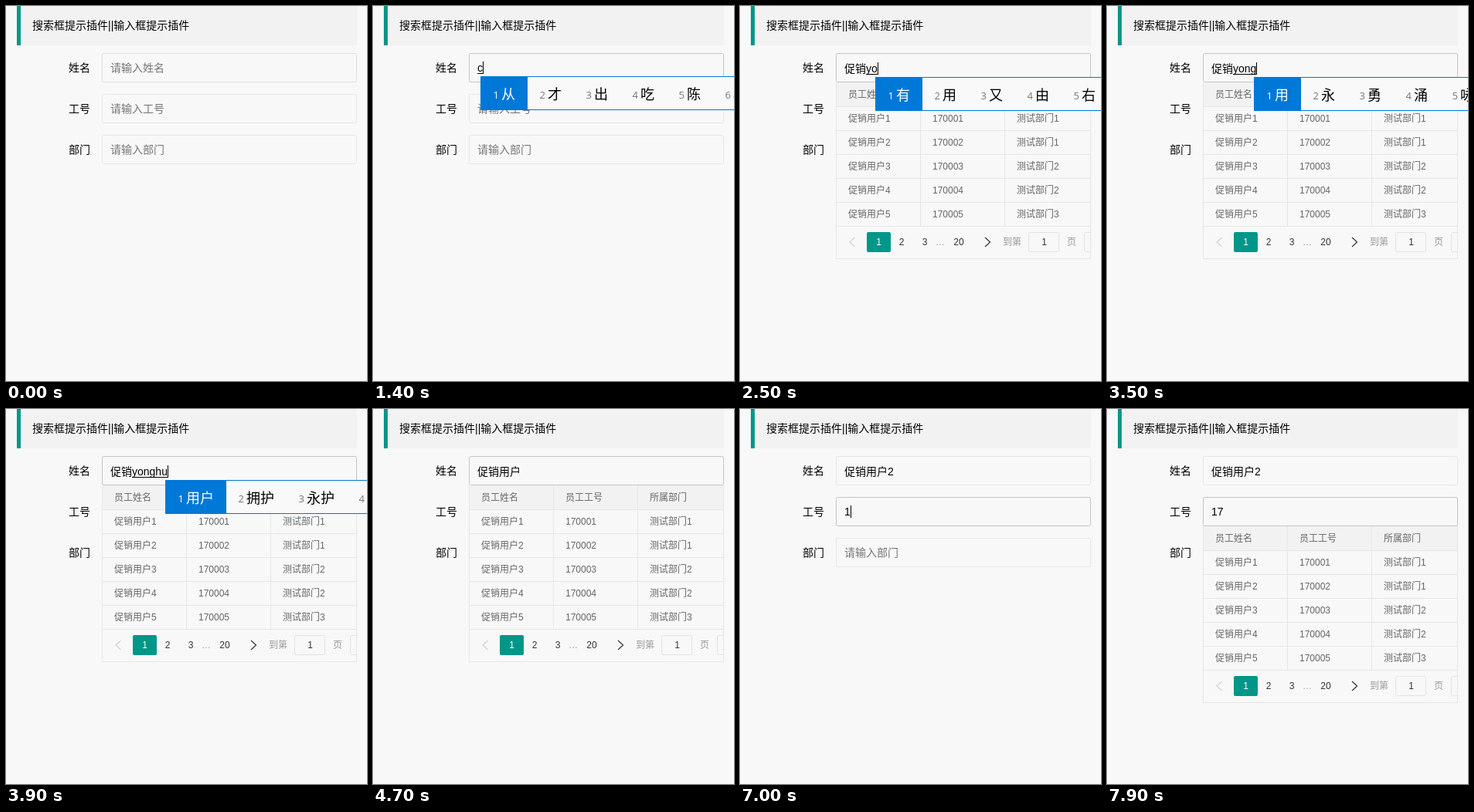
An HTML page for the animation above (8000 ms loop, 467 px wide and 486 px high).

```html
<!DOCTYPE html>
<html lang="zh-CN">
<head>
<meta charset="utf-8">
<style>
html, body { margin: 0; width: 100%; height: 100%; overflow: hidden; background: #f8f8f8; }
svg { display: block; }
text { font: 14px "Liberation Sans", "Noto Sans CJK SC", "Noto Sans CJK", sans-serif; white-space: pre; }
.small text { font-size: 12px; }
.ime .digit { font: 13px "Open Sans", "Noto Sans", sans-serif; }
.ime .word { font: 18px "Noto Sans CJK SC", "Noto Sans CJK", sans-serif; }
</style>
</head>
<body>
<svg id="stage" width="467" height="486" viewBox="0 0 467 486"></svg>
<script>
const LOOP = 8000;
const TEAL = '#009688', BLUE = '#0078d7', LINE = '#e6e6e6', FOCUS = '#c4c4c4';
const stage = document.getElementById('stage');

function add(parent, tag, attrs = {}, content = '') {
  const node = document.createElementNS('http://www.w3.org/2000/svg', tag);
  for (const key in attrs) node.setAttribute(key, attrs[key]);
  node.textContent = content;
  return parent.appendChild(node);
}
const fill = (parent, x, y, width, height, color, rx = 0) =>
  add(parent, 'rect', { x, y, width, height, fill: color, rx });
const frame = (parent, x, y, w, h, color) =>
  add(parent, 'rect', { x: x + .5, y: y + .5, width: w - 1, height: h - 1, rx: 2, fill: 'none', stroke: color });
const label = (parent, x, y, content, color = '#000', extra = {}) =>
  add(parent, 'text', { x, y, fill: color, ...extra }, content);
const show = (node, on) => node.setAttribute('visibility', on ? 'visible' : 'hidden');

// Static page
fill(stage, 14, 0, 5, 51, TEAL);
fill(stage, 19, 0, 435, 51, '#f2f2f2');
label(stage, 34, 30, '搜索框提示插件||输入框提示插件');

const fields = ['姓名', '工号', '部门'].map((name, i) => {
  const top = 61 + 53 * i;
  label(stage, 81, top + 24, name);
  return {
    top,
    border: frame(stage, 124, top, 330, 38, LINE),
    hint: label(stage, 135, top + 24, '请输入' + name, '#757575'),
    value: label(stage, 135, top + 24, '')
  };
});

// Suggestion table, drawn for the first field and shifted for the others
const table = add(stage, 'g', { class: 'small' });
fill(table, 124, 99, 330, 229, '#f8f8f8');
fill(table, 124, 99, 330, 31, '#f2f2f2');
const rows = [['员工姓名', '员工工号', '所属部门']];
[1, 1, 2, 2, 3].forEach((dept, i) =>
  rows.push([`促销用户${i + 1}`, `17000${i + 1}`, `测试部门${dept}`]));
rows.forEach((cells, r) => {
  cells.forEach((cell, c) => label(table, 140 + 109 * c, 119 + 31 * r, cell, '#666'));
  fill(table, 124, 130 + 31 * r, 330, 1, LINE);
});
[233, 342].forEach(x => fill(table, x, 99, 1, 186, LINE));
[124, 453].forEach(x => fill(table, x, 99, 1, 229, LINE));
fill(table, 124, 327, 330, 1, LINE);

const chevron = (d, stroke) => add(table, 'path', { d, stroke, fill: 'none', 'stroke-width': 1.2 });
chevron('M148.5 300L142 306L148.5 312', '#d2d2d2');
chevron('M317 300L323.5 306L317 312', '#333');
fill(table, 164, 293, 31, 26, TEAL, 2);
const pages = [[179.5, '1', '#fff'], [209, '2', '#333'], [239, '3', '#333'],
  [259, '…', '#999'], [283, '20', '#333'], [393.5, '1', '#333']];
pages.forEach(([x, s, color]) => label(table, x, 310, s, color, { 'text-anchor': 'middle' }));
label(table, 340, 310, '到第', '#999');
label(table, 423, 310, '页', '#999');
frame(table, 373, 293, 40, 26, '#e2e2e2');
add(table, 'path', { d: 'M454 293.5H447.5Q445.5 293.5 445.5 295.5V316.5Q445.5 318.5 447.5 318.5H454', fill: 'none', stroke: '#e2e2e2' });

const underline = fill(stage, 0, 0, 0, 1, '#000');
const caret = fill(stage, 0, 0, 1, 16, '#000');
const ime = add(stage, 'g', { class: 'ime' });

const candidates = {
  c: '从 才 出 吃 陈 村',
  cu: '粗 促 醋 簇 卒 猝',
  cux: '促销 粗细 粗线 粗选 促',
  y: '一 有 也 要 月 又',
  yo: '有 用 又 由 右 游',
  yon: '用 永 勇 涌 咏 拥',
  yong: '用 永 勇 涌 咏 拥',
  yongh: '用户 永恒 拥护 用好',
  yonghu: '用户 拥护 永护 用'
};

function drawIme(pinyin, left, top) {
  ime.textContent = '';
  if (!pinyin) return;
  fill(ime, left, top, 480, 44, '#f9f9f9');
  fill(ime, left, top, 480, 1, BLUE);
  fill(ime, left, top + 43, 480, 1, BLUE);
  let x = left;
  candidates[pinyin].split(' ').forEach((word, i) => {
    const width = 60 + 18 * (word.length - 1);
    if (!i) fill(ime, x, top, width + 1, 44, BLUE);
    label(ime, x + 16.5, top + 29, i + 1, i ? '#767676' : '#fff', { class: 'digit' });
    label(ime, x + 27, top + 29.5, word, i ? '#000' : '#fff', { class: 'word' });
    x += width;
  });
}

// Each step lists only what changes: field values, pinyin, focus, caret, table
const start = { name: '', number: '', pinyin: '', focus: -1, caret: 0, table: -1, fade: 1, edge: '#dedede' };
const steps = [
  [0, {}],
  [400, { focus: 0, caret: 1, edge: LINE }],
  [600, { caret: 0 }],
  [1000, { caret: 1 }],
  [1400, { pinyin: 'c' }],
  [1500, { pinyin: 'cu' }],
  [1600, { pinyin: 'cux', table: 0 }],
  [2000, { name: '促销', pinyin: '' }],
  [2400, { pinyin: 'y' }],
  [2500, { pinyin: 'yo' }],
  [2600, { pinyin: 'yon' }],
  [3100, { caret: 0 }],
  [3500, { pinyin: 'yong', caret: 1 }],
  [3800, { pinyin: 'yongh' }],
  [3900, { pinyin: 'yonghu' }],
  [4200, { name: '促销用户', pinyin: '' }],
  [4700, { caret: 0 }],
  [5200, { caret: 1 }],
  [5600, { focus: -1, caret: 0, edge: '#d8d8d8' }],
  [5700, { edge: LINE }],
  [5900, { name: '促销用户2', fade: .4 }],
  [6000, { table: -1, fade: 1 }],
  [6300, { focus: 1, caret: 1 }],
  [6500, { caret: 0 }],
  [6900, { caret: 1 }],
  [7000, { number: '1' }],
  [7100, { table: 1 }],
  [7500, { number: '17' }],
  [7900, { caret: 0 }]
];
let last = start;
const states = steps.map(([, change]) => last = { ...last, ...change });

function render(s) {
  fields.forEach((field, i) => {
    const base = [s.name, s.number, ''][i];
    const typing = s.focus === i;
    const value = base + (typing ? s.pinyin : '');
    const drop = /[^\x00-\x7f]/.test(base) ? 1 : 0;
    field.border.setAttribute('stroke', typing ? FOCUS : i ? LINE : s.edge);
    show(field.hint, !value);
    field.value.textContent = value;
    field.value.setAttribute('y', field.top + 24 + drop);
    if (!typing) return;
    const end = 135 + Math.round(value ? field.value.getComputedTextLength() : 0);
    const from = 135 + 14 * base.length;
    const top = field.top + 11 + drop;
    caret.setAttribute('x', end);
    caret.setAttribute('y', top);
    underline.setAttribute('x', from);
    underline.setAttribute('y', top + 15);
    underline.setAttribute('width', Math.max(0, end - from));
    drawIme(s.pinyin, end - 3, top + 19);
  });
  show(caret, s.caret);
  show(underline, s.pinyin);
  show(table, s.table >= 0);
  table.setAttribute('opacity', s.fade);
  table.setAttribute('transform', `translate(0 ${53 * Math.max(0, s.table)})`);
}

const began = performance.now();
let shown = -1;
function tick() {
  const time = (performance.now() - began) % LOOP;
  let index = steps.length - 1;
  while (steps[index][0] > time) index--;
  if (index !== shown) render(states[shown = index]);
  requestAnimationFrame(tick);
}
tick();
</script>
</body>
</html>
```
